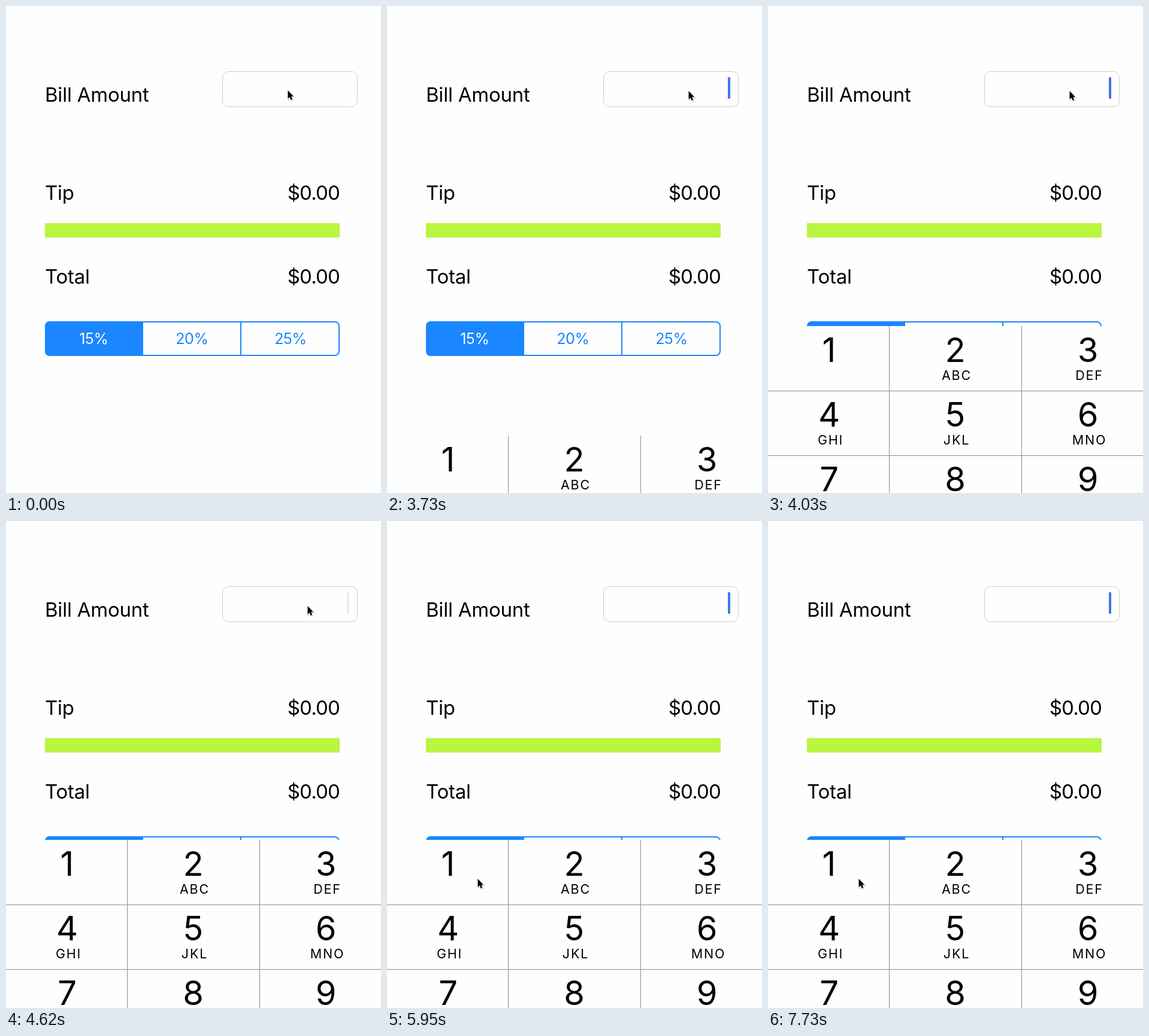
Write an HTML page that moves like this. It is 626 px wide and 814 px high and loops after 8 s.

```html
<!DOCTYPE html>
<html lang="en">
<head>
<meta charset="utf-8">
<title>Tip calculator</title>
<style>
  html, body { margin: 0; width: 100%; height: 100%; overflow: hidden; background: #fefefe; }
  svg { display: block; width: 626px; height: 814px; font-family: Inter, Roboto, sans-serif; }
  .label { font-size: 33px; letter-spacing: -.22px; }
  .money { font-size: 33px; letter-spacing: -.85px; text-anchor: end; }
  .seg { font-size: 25px; letter-spacing: -.3px; text-anchor: middle; fill: #1a86ff; }
  .digit { font-size: 56px; text-anchor: middle; }
  .abc { font-size: 21.5px; letter-spacing: 1.8px; text-anchor: middle; }

  #pad, #caret, #mouse { animation: 8s step-end infinite; }
  #pad { animation-name: pad; }
  #caret { animation-name: blink; }
  #mouse { animation-name: move; }

  @keyframes pad {
    0% { transform: translateY(814px); }
    46.625% { transform: translateY(718px); }
    48.5% { transform: translateY(556px); }
    50.375% { transform: translateY(535px); }
    52.25%, 100% { transform: translateY(533px); }
  }
  @keyframes blink {
    0% { opacity: 0; }
    46.625% { opacity: 1; }
    52.25% { opacity: .5; }
    54.125% { opacity: 0; }
    57.75% { opacity: .12; }
    59.625% { opacity: 1; }
    65.125% { opacity: .4; }
    67% { opacity: 0; }
    70.75% { opacity: .3; }
    72.5% { opacity: 1; }
    78% { opacity: .6; }
    79.875% { opacity: 0; }
    83.625% { opacity: 1; }
    89.25% { opacity: .6; }
    91.125% { opacity: 0; }
    94.75% { opacity: .12; }
    96.625%, 100% { opacity: 1; }
  }
  @keyframes move {
    0% { transform: translate(470px, 141px); }
    1.75% { transform: translate(485px, 142px); }
    3.625% { transform: translate(502px, 142px); }
    5.5% { transform: translate(503px, 142px); }
    67% { transform: translate(469px, 204px); }
    68.875% { transform: translate(325px, 427px); }
    70.75% { transform: translate(186px, 574px); }
    72.5% { transform: translate(153px, 599px); }
    74.375%, 100% { transform: translate(151px, 598px); }
  }
</style>
</head>
<body>
<svg viewBox="0 0 626 814">
  <text class="label" x="65" y="160">Bill Amount</text>
  <rect x="361.5" y="109.5" width="225" height="59" rx="10" fill="#fefefe" stroke="#ccc"/>
  <rect id="caret" x="569" y="119" width="4" height="36" rx="1" fill="#3f78ea"/>

  <text class="label" x="65" y="324">Tip</text>
  <text class="money" x="557" y="324">$0.00</text>
  <rect x="65" y="363" width="492" height="24" fill="#b8f63f"/>
  <text class="label" x="65" y="464">Total</text>
  <text class="money" x="557" y="464">$0.00</text>

  <rect x="66" y="528" width="490" height="56" rx="7" fill="none" stroke="#1a86ff" stroke-width="2"/>
  <path d="M229 527H73a8 8 0 0 0-8 8v42a8 8 0 0 0 8 8H229zM391 527h2v58h-2z" fill="#1a86ff"/>
  <text class="seg" x="146.5" y="565" style="fill:#fff">15%</text>
  <text class="seg" x="310.5" y="565">20%</text>
  <text class="seg" x="475" y="565">25%</text>

  <g id="pad">
    <rect width="626" height="330" fill="#fefefe"/>
    <path d="M202.5 0V330M423.5 0V330M0 108.5H626M0 216.5H626" stroke="#8c8c8c" fill="none"/>
  </g>

  <g id="mouse">
    <path d="M1 1V14.2L4 11.5 6 16.2 8.3 15.2 6.3 10.6H10.4Z" transform="translate(.6 1)"
      fill="none" stroke="#000" stroke-width="2" opacity=".16"/>
    <path d="M.5 0V14L3.6 11.2 5.6 16 8.2 14.9 6.2 10.3H10.2Z" stroke="#fff" stroke-width="1.6"
      paint-order="stroke" stroke-linejoin="round"/>
  </g>
</svg>
<script>
  const pad = document.getElementById('pad');
  const letters = ['', 'ABC', 'DEF', 'GHI', 'JKL', 'MNO', 'PQRS', 'TUV', 'WXYZ'];
  const centers = [102, 312.5, 534];

  function addText(cls, x, y, value) {
    const el = document.createElementNS('http://www.w3.org/2000/svg', 'text');
    el.setAttribute('class', cls);
    el.setAttribute('x', x);
    el.setAttribute('y', y);
    el.textContent = value;
    pad.append(el);
  }

  letters.forEach((abc, i) => {
    const x = centers[i % 3], y = Math.floor(i / 3) * 108;
    addText('digit', x, y + 60, i + 1);
    addText('abc', x + 2.5, y + 90, abc);
  });
</script>
</body>
</html>
```
